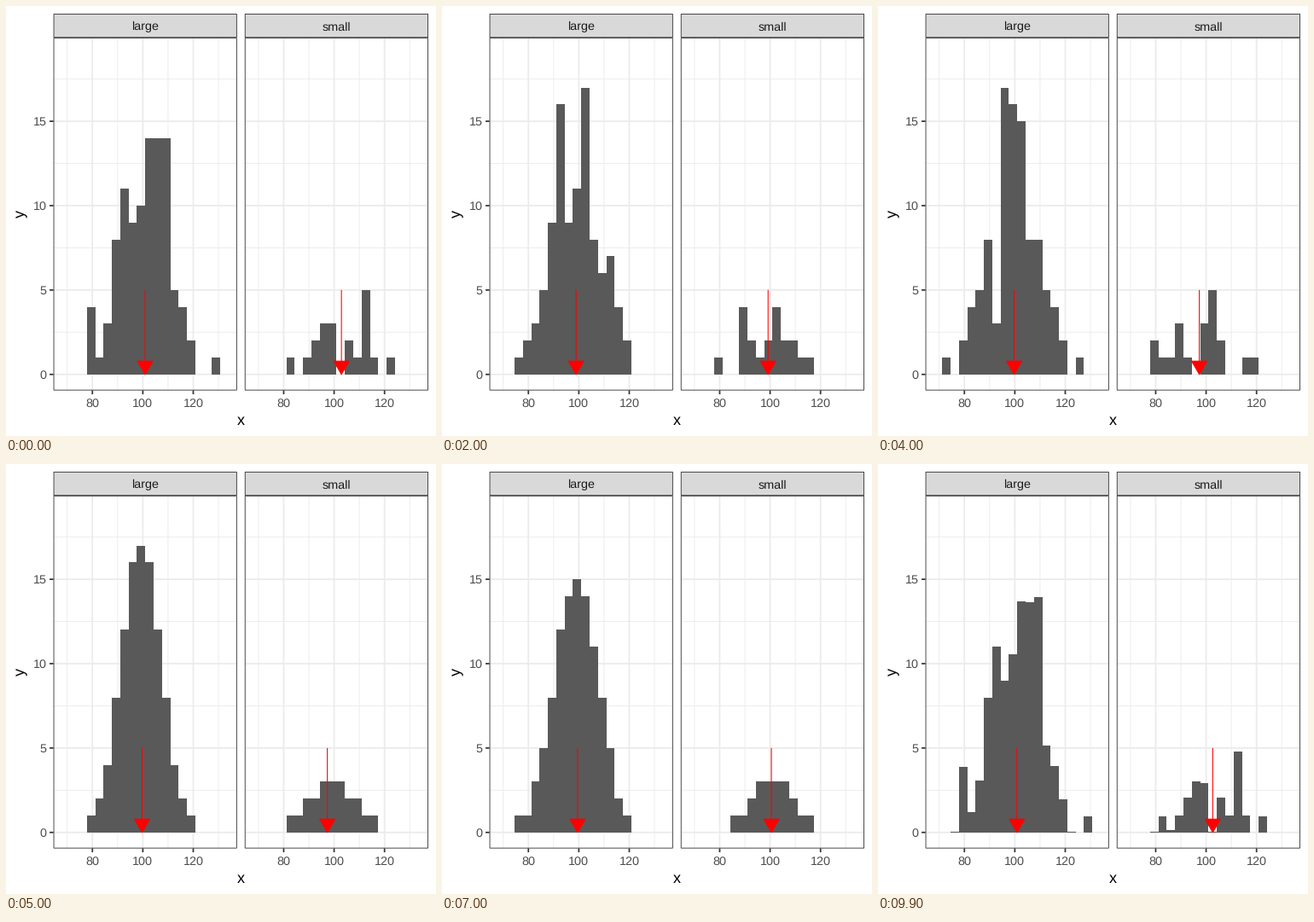
Animation, 504 px wide and 504 px high, one loop 10000 ms. Source, as a matplotlib script:

```python
import numpy as np
import matplotlib.pyplot as plt
from matplotlib.animation import FuncAnimation
from matplotlib.patches import Polygon, Rectangle

plt.rcParams["font.family"] = "Liberation Sans"
plt.rcParams["text.hinting"] = "none"

SIZE, DPI = 504, 72            # one point equals one pixel
BINS, BIN_W = 20, 3.31
PANEL_W, GAP = 215.2, 9
LEFT, TOP, BOTTOM = 55.6, 37.2, 450.6
STRIP_TOP = 9
BASE, UNIT_Y = 431.8, 19.78    # pixel row of y = 0, pixels per count
BIN_PX = PANEL_W / 1.1 / BINS
UNIT_X = BIN_PX / BIN_W
X_MIN = 20.5 * BIN_W           # left edge of the first bin
LINE = 1.75
HALF = LINE / 2

BAR, GRID, EDGE = "#595959", "#EBEBEB", "#333333"
STRIP, AXIS_TEXT, STRIP_TEXT = "#D9D9D9", "#4D4D4D", "#1A1A1A"


def hist(start, *counts):
    """Counts per bin, beginning at bin `start`."""
    row = np.zeros(BINS)
    row[start:start + len(counts)] = counts
    return row


def bell(peak, middle, total):
    """Rounded bell-shaped counts adding up to about `total`."""
    spread = total / (peak * np.sqrt(2 * np.pi))
    z = (np.arange(BINS) - middle) / spread
    return np.round(peak * np.exp(-z ** 2 / 2))


LARGE = [
    hist(3, 4, 1, 3, 8, 11, 9, 10, 14, 14, 14, 5, 4, 2, 0, 0, 1),
    bell(19, 9, 100),
    hist(2, 1, 2, 3, 5, 9, 16, 9, 11, 17, 8, 6, 7, 4, 2),
    hist(2, 1, 3, 5, 2, 4, 11, 13, 9, 14, 8, 12, 6, 2, 4, 5, 1),
    hist(1, 1, 0, 2, 4, 5, 8, 3, 17, 16, 15, 8, 8, 5, 4, 2, 0, 1),
    bell(17, 9, 100),
    hist(0, 1, 1, 0, 3, 1, 2, 8, 12, 10, 9, 9, 16, 9, 11, 3, 3, 1, 1),
    bell(15, 8.9, 100),
    hist(3, 1, 3, 5, 12, 10, 14, 11, 13, 7, 13, 3, 3, 2, 1, 1, 0, 1),
    hist(2, 1, 2, 4, 4, 8, 11, 9, 19, 9, 8, 13, 7, 3, 1, 1),
]
SMALL = [
    hist(4, 1, 0, 1, 2, 3, 3, 0, 2, 1, 5, 1, 0, 1),
    bell(3, 10, 20),
    hist(3, 1, 0, 0, 4, 2, 1, 2, 4, 2, 2, 1, 1),
    hist(5, 3, 0, 1, 0, 6, 1, 1, 4, 1, 0, 2, 0, 1),
    hist(3, 2, 1, 1, 3, 1, 0, 3, 5, 2, 0, 0, 1, 1),
    bell(3, 9, 20),
    hist(3, 1, 1, 1, 3, 1, 2, 3, 3, 3, 2),
    bell(3, 9.5, 20),
    hist(3, 1, 0, 1, 0, 1, 3, 2, 5, 3, 0, 1, 3),
    hist(3, 1, 0, 2, 1, 3, 3, 2, 1, 3, 1, 2, 1),
]
LARGE_MEANS = [100.9, 99.4, 98.9, 101.3, 99.7, 99.7, 101.3, 99.5, 100.1, 99.6]
SMALL_MEANS = [102.9, 100.9, 99.2, 103.4, 97.3, 97.3, 97.35, 100.5, 101.7, 98.8]

STEPS, HOLD = 10, 6            # frames per state, last resting frame
FRAMES = STEPS * len(LARGE)

fig = plt.figure(figsize=(SIZE / DPI, SIZE / DPI), dpi=DPI, facecolor="white")
ax = fig.add_axes([0, 0, 1, 1])
ax.set(xlim=(0, SIZE), ylim=(SIZE, 0))
ax.axis("off")


def line(xs, ys, color, width, z):
    return ax.plot(xs, ys, color=color, lw=width, zorder=z, snap=False,
                   solid_capstyle="butt")[0]


def label(x, y, text, size, color, ha="center", **kw):
    ax.text(x, y, text, size=size, color=color, ha=ha, va="baseline",
            zorder=6, **kw)


def frame_box(x0, y0, x1, y1, fill, z):
    """Box whose outline lies just inside its edges."""
    inset = HALF / 2
    ax.add_patch(Rectangle((x0 + inset, y0 + inset), x1 - x0 - HALF,
                           y1 - y0 - HALF, fc=fill, ec=EDGE, lw=HALF,
                           joinstyle="miter", snap=False, zorder=z))


def row(value):
    return BASE - value * UNIT_Y


class Panel:
    def __init__(self, left, title, states, means):
        self.left, self.states, self.means = left, states, means
        self.draw_frame(title)
        self.edges = np.round(self.column(X_MIN + BIN_W * np.arange(BINS + 1)))
        self.bars = [
            ax.add_patch(Rectangle((a, round(BASE)), b - a, 0, fc=BAR, lw=0,
                                   antialiased=False, zorder=3))
            for a, b in zip(self.edges, self.edges[1:])
        ]
        self.shaft = line([0, 0], [row(5), BASE], "red", 1.07, 4)
        self.head = ax.add_patch(Polygon(np.zeros((3, 2)), fc="red", ec="red",
                                         lw=1.07, joinstyle="round",
                                         snap=False, zorder=4))

    def column(self, x):
        return self.left + PANEL_W / 22 + (x - X_MIN) * UNIT_X

    def draw_frame(self, title):
        left, right = self.left, self.left + PANEL_W
        for i in range(8):
            y = row(2.5 * i)
            line([left, right], [y, y], GRID, HALF if i % 2 else LINE, 2 - i % 2)
        for value in range(70, 131, 10):
            x, major = self.column(value), value % 20 == 0
            line([x, x], [TOP, BOTTOM], GRID, LINE if major else HALF, 1 + major)
            if major:
                line([x, x], [BOTTOM, BOTTOM + 4.5], EDGE, LINE, 5)
                label(x, 469.6, str(value), 14.4, AXIS_TEXT)
        frame_box(left, TOP, right, BOTTOM, "none", 5)
        frame_box(left, STRIP_TOP, right, TOP, STRIP, 5)
        label((left + right) / 2, 28.5, title, 14.4, STRIP_TEXT)

    def update(self, state, t):
        after = (state + 1) % len(self.states)

        def mix(seq):
            return seq[state] * (1 - t) + seq[after] * t

        for bar, count in zip(self.bars, mix(self.states)):
            top = round(row(count))
            bar.set_y(top)
            bar.set_height(round(BASE) - top)
        x = self.column(mix(self.means))
        self.shaft.set_xdata([x, x])
        back = BASE - 18 * np.cos(np.pi / 6)
        self.head.set_xy([(x - 9, back), (x, BASE), (x + 9, back)])


panels = [
    Panel(LEFT, "large", LARGE, LARGE_MEANS),
    Panel(LEFT + PANEL_W + GAP, "small", SMALL, SMALL_MEANS),
]

for value in (0, 5, 10, 15):
    y = row(value)
    line([LEFT - 4.5, LEFT], [y, y], EDGE, LINE, 5)
    label(47.5, y + 5.2, str(value), 14.4, AXIS_TEXT, ha="right")
label(LEFT + PANEL_W + GAP / 2, 490.8, "x", 18, "black")
ax.text(22.5, (TOP + BOTTOM) / 2, "y", size=18, color="black", rotation=90,
        rotation_mode="anchor", ha="center", va="baseline")


def ease(t):
    """Cubic in and out."""
    return 4 * t ** 3 if t < 0.5 else 1 - 4 * (1 - t) ** 3


def draw(frame):
    state, step = divmod(frame, STEPS)
    t = ease(max(0, step - HOLD) / (STEPS - HOLD))
    for panel in panels:
        panel.update(state, t)
    return []


anim = FuncAnimation(fig, draw, frames=FRAMES, interval=100, repeat=True,
                     repeat_delay=0, init_func=lambda: draw(0))
plt.show()
```
